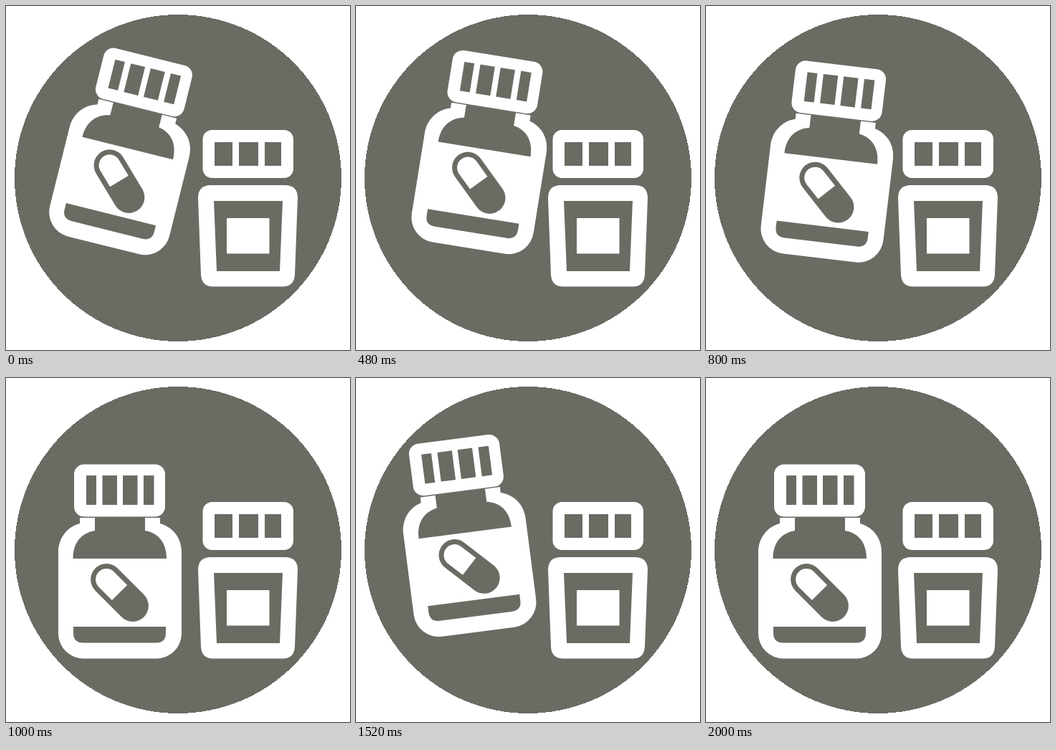
These frames come from a looping animation (480x480 px, 3000 ms). An HTML page:

```html
<!DOCTYPE html>
<html lang="en">
<head>
<meta charset="utf-8">
<title>Medicine bottles</title>
<style>
  html, body { margin: 0; width: 100%; height: 100%; overflow: hidden; background: #fff; }
  svg { display: block; width: 100vw; height: 100vh; fill: #fff; }
  .dark { fill: #6b6b64; }
</style>
</head>
<body>
<svg viewBox="0 0 480 480">
  <circle class="dark" cx="240" cy="240" r="228" shape-rendering="crispEdges"/>

  <g id="small">
    <rect x="274.5" y="173" width="126.5" height="67" rx="13"/>
    <path class="dark" d="M291 190h25v33h-25zM325 190h27v33h-27zM361 190h23v33h-23z"/>
    <path d="M286 250H389Q407 250 407 268L403 375Q402 391.500 386 391.500H289Q273 391.500 272 375L268 268Q268 250 286 250Z"/>
    <path class="dark" d="M290 272H386L382 370H294Z"/>
    <rect x="308" y="296" width="59.500" height="49.500"/>
  </g>

  <g id="large">
    <rect x="95" y="120.500" width="127" height="73" rx="14"/>
    <path class="dark" d="M112 136h14v41h-14zM134.500 136h20.500v41h-20.500zM163 136h20.500v41h-20.500zM192 136h14.500v41h-14.500z"/>
    <path d="M103 195H215V203C235 209 245 225 245 243V356A35 35 0 0 1 210 391.500H108A35 35 0 0 1 73 356V243C73 225 84 208 103 203Z"/>
    <path class="dark" d="M124 194.500H194V213C212 216 224 229 224 252H93.500C93.500 229 106 216 124 213Z"/>
    <path class="dark" d="M94 347H223V356Q223 369.500 209 369.500H108Q94 369.500 94 356Z"/>
    <g transform="translate(158.500 299.500) rotate(45)">
      <rect class="dark" x="-48" y="-22" width="96" height="44" rx="22"/>
      <path d="M0 -15H-26A15 15 0 0 0 -26 15H0Z"/>
    </g>
  </g>
</svg>
<script>
  const LOOP = 3000, STEP = 40;

  // Keys: [time in ms, dx, dy, degrees]
  const parts = [
    { node: document.getElementById("large"), pivot: "159 256", keys: [
      [330, 10, -53.5, 14], [500, 21, -52, 8.5], [670, 13, -53, 12],
      [833, 15.5, -35.5, 5.5], [1000, 0, 0, 0], [1330, 0, 0, 0],
      [1510, -6.3, -38.5, -7.8], [1680, 0, 0, 0]] },
    { node: document.getElementById("small"), pivot: "337.5 282.5", keys: [
      [1680, 0, 0, 0], [1840, 7.5, -19, 7], [2000, 0, 0, 0]] }
  ];

  function poseAt(keys, time) {
    const next = keys.findIndex(key => key[0] > time);
    if (next === 0) return keys[0].slice(1);
    if (next < 0) return keys[keys.length - 1].slice(1);
    const a = keys[next - 1], b = keys[next];
    const part = (time - a[0]) / (b[0] - a[0]);
    return a.slice(1).map((value, i) => value + (b[i + 1] - value) * part);
  }

  function draw() {
    const time = Math.floor(performance.now() % LOOP / STEP) * STEP;
    for (const { node, pivot, keys } of parts) {
      const [dx, dy, angle] = poseAt(keys, time);
      node.setAttribute("transform", `translate(${dx} ${dy}) rotate(${angle} ${pivot})`);
    }
    requestAnimationFrame(draw);
  }
  draw();
</script>
</body>
</html>
```
